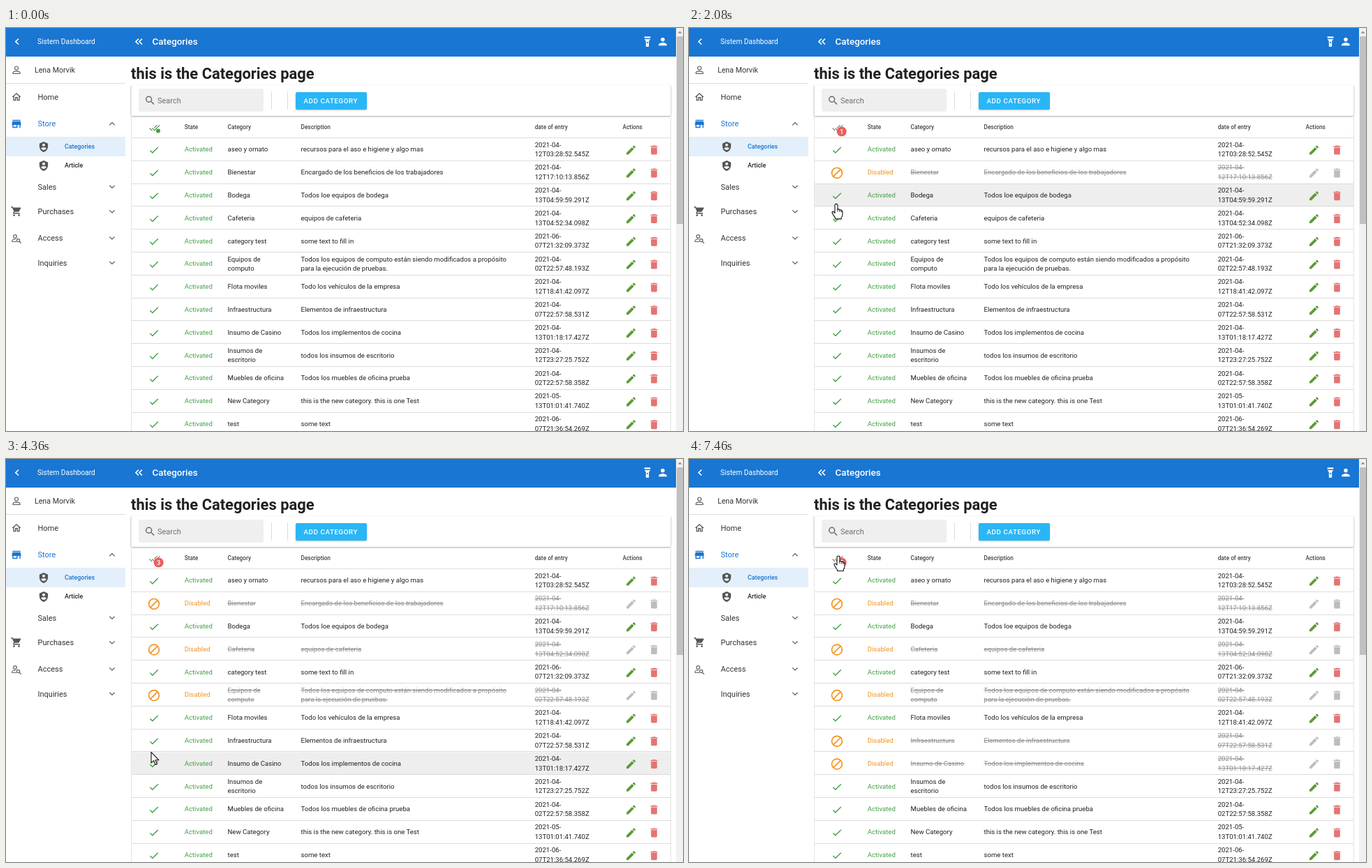
An HTML page that plays this animation: 970 px wide and 578 px high, repeating every 8 s.

```html
<!DOCTYPE html>
<html lang="en">
<head>
<meta charset="utf-8">
<title>Categories</title>
<style>
html, body { margin: 0; width: 100%; height: 100%; overflow: hidden; background: #fff; }
svg { display: block; width: 970px; height: 578px; }
text { font-family: Roboto, "Open Sans", sans-serif; font-size: 9.6px; fill: #212121; }
.off { fill: #8c8c8c; text-decoration: line-through; }
.menu { font-size: 11px; fill: #333; }
.sub { font-size: 8.9px; font-weight: 500; }
.head { font-size: 8.3px; font-weight: 500; fill: #444; }
</style>
</head>
<body>
<svg id="stage" viewBox="0 0 970 578"></svg>
<script>
const NS = 'http://www.w3.org/2000/svg';
const stage = document.getElementById('stage');
const LOOP = 8000, TOP = 158, PITCH = 32.8;
const BLUE = '#1976d2', GREEN = '#43a047', ORANGE = '#f39420', GREY = '#bdbdbd', DARK = '#555';

const ICON = {
  check: 'M9 16.17 4.83 12l-1.42 1.41L9 19 21 7l-1.41-1.41z',
  checkAll: 'M18 7l-1.41-1.41-6.34 6.34 1.41 1.41L18 7zm4.24-1.41L11.66 16.17 7.48 12l-1.41 1.41L11.66 19l12-12-1.42-1.41zM.41 13.41L6 19l1.41-1.41L1.83 12 .41 13.41z',
  edit: 'M3 17.25V21h3.75L17.81 9.94l-3.75-3.75L3 17.25zM20.71 7.04c.39-.39.39-1.02 0-1.41l-2.34-2.34c-.39-.39-1.02-.39-1.41 0l-1.83 1.83 3.75 3.75 1.83-1.83z',
  bin: 'M6 19c0 1.1.9 2 2 2h8c1.1 0 2-.9 2-2V7H6v12zM19 4h-3.5l-1-1h-5l-1 1H5v2h14V4z',
  person: 'M12 12c2.21 0 4-1.79 4-4s-1.79-4-4-4-4 1.79-4 4 1.79 4 4 4zm0 2c-2.67 0-8 1.34-8 4v2h16v-2c0-2.66-5.33-4-8-4z',
  home: 'M12 5.69l5 4.5V18h-2v-6H9v6H7v-7.81l5-4.5M12 3L2 12h3v8h6v-6h2v6h6v-8h3L12 3z',
  store: 'M20 4H4v2h16V4zm1 10v-2l-1-5H4l-1 5v2h1v6h10v-6h4v6h2v-6h1zm-9 4H6v-4h6v4z',
  cart: 'M7 18a2 2 0 1 0 0 4 2 2 0 1 0 0-4zM1 2v2h2l3.6 7.59-1.35 2.45C4.5 15.4 5.5 17 7 17h12v-2H7.42c-.2 0-.3-.2-.22-.37l.9-1.63h7.45c.75 0 1.41-.41 1.75-1.03l3.58-6.49A1 1 0 0 0 20 4H5.21l-.94-2H1zm16 16a2 2 0 1 0 0 4 2 2 0 1 0 0-4z',
  search: 'M15.5 14h-.79l-.28-.27A6.47 6.47 0 0 0 16 9.5 6.5 6.5 0 1 0 9.5 16c1.61 0 3.09-.59 4.23-1.57l.27.28v.79l5 4.99L20.49 19zm-6 0a4.5 4.5 0 1 1 0-9 4.5 4.5 0 0 1 0 9z',
  torch: 'M6 2h12v3H6zM6 7h12l-3 4v11H9V11zM12 12.5a1.5 1.5 0 1 0 0 3 1.5 1.5 0 0 0 0-3z',
  shield: 'M12 1L3 5v6c0 5.55 3.84 10.74 9 12 5.16-1.26 9-6.45 9-12V5zm0 4a3 3 0 1 1 0 6 3 3 0 0 1 0-6zM6.5 15c1-2 9.5-2.800 11 0-1.200 2-3 3.500-5.500 3.500S7.500 17 6.500 15z'
};

function el(tag, attrs, parent = stage) {
  const node = document.createElementNS(NS, tag);
  for (const key in attrs) node.setAttribute(key, attrs[key]);
  parent.appendChild(node);
  return node;
}
const rect = (x, y, width, height, fill, rx = 0, parent) => el('rect', { x, y, width, height, fill, rx }, parent);
const line = (d, stroke, width = 1.4, parent) => el('path', { d, stroke, 'stroke-width': width, fill: 'none' }, parent);
function text(str, x, y, attrs = {}, parent) {
  const node = el('text', { x, y, ...attrs }, parent);
  node.textContent = str;
  return node;
}
function icon(name, x, y, scale, fill, parent) {
  const transform = `translate(${x} ${y}) scale(${scale}) translate(-12 -12)`;
  return el('path', { d: ICON[name], transform, fill, 'fill-rule': 'evenodd' }, parent);
}
const show = (node, on) => node.setAttribute('visibility', on ? 'visible' : 'hidden');

const ROWS = [
  ['aseo y ornato', 'recursos para el aso e higiene y algo mas', '04-12T03:28:52.545Z'],
  ['Bienestar', 'Encargado de los beneficios de los trabajadores', '04-12T17:10:13.856Z'],
  ['Bodega', 'Todos loe equipos de bodega', '04-13T04:59:59.291Z'],
  ['Cafeteria', 'equipos de cafeteria', '04-13T04:52:34.098Z'],
  ['category test', 'some text to fill in', '06-07T21:32:09.373Z'],
  ['Equipos de|computo', 'Todos los equipos de computo están siendo modificados a propósito|para la ejecución de pruebas.', '04-02T22:57:48.193Z'],
  ['Flota moviles', 'Todo los vehículos de la empresa', '04-12T18:41:42.097Z'],
  ['Infraestructura', 'Elementos de infraestructura', '04-07T22:57:58.531Z'],
  ['Insumo de Casino', 'Todos los implementos de cocina', '04-13T01:18:17.427Z'],
  ['Insumos de|escritorio', 'todos los insumos de escritorio', '04-12T23:27:25.752Z'],
  ['Muebles de oficina', 'Todos los muebles de oficina prueba', '04-02T22:57:58.358Z'],
  ['New Category', 'this is the new category. this is one Test', '05-13T01:01:41.740Z'],
  ['test', 'some text', '06-07T21:36:54.269Z']
];

// Time and row of each click
const CLICKS = [[1550, 1], [2480, 3], [3720, 5], [4700, 7], [5490, 8]];

// Pointer path: time, x, y of the hot spot
const PATH = [
  [260, 240, 582], [650, 222, 330], [1010, 210, 214], [1210, 210, 214], [1340, 211, 211],
  [1640, 211, 211], [2280, 211, 271], [2550, 211, 271], [2760, 210, 320], [3110, 211, 349],
  [3230, 211, 349], [3440, 211, 345], [3800, 211, 345], [4360, 208, 420.3], [4420, 209, 430],
  [4550, 209, 430], [4640, 210, 409], [4900, 210, 409], [5230, 213, 433], [5760, 213, 433],
  [6170, 234, 335], [6310, 232, 246], [6650, 222, 165], [7000, 216, 138], [7310, 216, 138],
  [7320, 215, 140], [7450, 215, 140], [7460, 214, 139]
];

function drawTop() {
  rect(0, 0, 960, 41, BLUE);
  line('M18 15.500l-4.200 4 4.200 4', '#fff', 1.7);
  line('M190 15.500l-4 4 4 4M195 15.500l-4 4 4 4', '#fff', 1.7);
  text('Sistem Dashboard', 45, 23, { style: 'font-size:10.15px;fill:#fff' });
  text('Categories', 209.500, 24, { style: 'font-size:13.4px;font-weight:500;fill:#fff' });
  icon('torch', 919, 19.5, .72, '#fff');
  icon('person', 941, 19.5, .72, '#fff');
  rect(960, 0, 10, 578, '#f1f1f1');
  rect(961, 12, 9, 269, '#c1c1c1');
  el('path', { d: 'M962.500 7.500l3-3 3 3z', fill: '#8a8a8a' });
}

function drawMenu() {
  line('M0 79.500H171', '#ddd', 1);
  rect(0, 156, 171, 28, '#e3effa');
  const outline = { fill: 'none', stroke: '#666', 'stroke-width': 1.2 };
  el('circle', { cx: 15, cy: 57.5, r: 2.5, ...outline });
  el('path', { d: 'M10 65.300v-1.300q0-2 5-2.200 5 .2 5 2.200v1.300z', ...outline });
  icon('home', 15, 99, .66, DARK);
  icon('store', 15, 137.5, .72, BLUE);
  icon('shield', 54, 170.5, .68, DARK);
  icon('shield', 54, 197.5, .68, DARK);
  icon('cart', 15, 263, .7, DARK);
  el('circle', { cx: 13, cy: 299, r: 2.4, ...outline });
  el('path', { d: 'M15 306.500H8.800v-1.500q0-1.800 5-2', ...outline });
  el('circle', { cx: 17.5, cy: 304.5, r: 2.2, ...outline });
  line('M19.200 306.200l2.500 2.500', '#666', 1.3);

  text('Lena Morvik', 41, 63.5, { class: 'menu', style: 'font-size:10.65px' });
  text('Home', 45.5, 103, { class: 'menu' });
  text('Store', 45.5, 141, { class: 'menu', style: 'fill:' + BLUE });
  text('Categories', 84, 173, { class: 'sub', style: 'fill:' + BLUE });
  text('Article', 84, 200, { class: 'sub' });
  line('M148.300 139.300l3.700-3.700 3.700 3.700', DARK, 1.2);
  [['Sales', 227.5], ['Purchases', 263], ['Access', 301], ['Inquiries', 336.5]].forEach(([name, y]) => {
    text(name, 45.5, y + 4, { class: 'menu' });
    line(`M148.300 ${y - 1.7}l3.700 3.700 3.700-3.700`, DARK, 1.2);
  });
}

function drawToolbar() {
  text('this is the Categories page', 179, 73, { style: 'font-size:21.9px;font-weight:700' });
  rect(179, 82, 773.5, 44, '#fff', 2).setAttribute('style', 'filter:drop-shadow(0 1px 1px rgba(0,0,0,.35))');
  rect(190, 87, 179, 33, '#efefef', 3);
  icon('search', 206.5, 104, .72, '#666');
  text('Search', 217, 107.500, { style: 'font-size:11px;fill:#707070' });
  line('M380.500 91V117M403.500 91V117', '#ddd', 1);
  rect(415, 92, 102, 25, '#29b6f6', 2).setAttribute('style', 'filter:drop-shadow(0 1px 1px rgba(0,0,0,.25))');
  text('ADD CATEGORY', 426.5, 107.7, { style: 'font-size:9.8px;font-weight:500;letter-spacing:.55px;fill:#fff' });
}

function block(parent, x, y) {
  el('circle', { cx: x, cy: y, r: 7.4, fill: 'none', stroke: ORANGE, 'stroke-width': 1.7 }, parent);
  line(`M${x + 5.2} ${y - 5.2}L${x - 5.2} ${y + 5.2}`, ORANGE, 1.7, parent);
}

function drawCells(parent, row, mid, off) {
  const cls = off ? { class: 'off' } : {};
  const cell = (str, x) => {
    const parts = str.split('|');
    parts.forEach((part, i) => text(part, x, mid + 3.300 + (i - (parts.length - 1) / 2) * 13.7, cls, parent));
  };
  if (off) block(parent, 212, mid + 1);
  else icon('check', 212, mid + 1, .7, GREEN, parent);
  text(off ? 'Disabled' : 'Activated', 255.7, mid + 3.3, { style: 'fill:' + (off ? ORANGE : GREEN) }, parent);
  cell(row[0], 317.5);
  cell(row[1], 422.5);
  cell('2021-' + row[2].replace('-', '-|'), 757.7);
  icon('edit', 895.5, mid + 1, .72, off ? GREY : '#5b9b35', parent);
  icon('bin', 928.5, mid + 1, .72, off ? GREY : '#e57373', parent);
}

drawToolbar();
const hover = rect(179, 0, 773, PITCH, '#eee');
[['State', 255.7], ['Category', 317.5], ['Description', 422.5], ['date of entry', 757.7], ['Actions', 883.5]]
  .forEach(([name, x]) => text(name, x, 145, { class: 'head' }));
const allMark = icon('checkAll', 213, 143, .68, GREEN);
const dot = el('circle', { cx: 218, cy: 147.5, r: 3, fill: GREEN });
const badge = el('g', {});
el('circle', { cx: 218.7, cy: 148.5, r: 7, fill: '#e5625e' }, badge);
const count = text('', 218.7, 151.7, { 'text-anchor': 'middle', style: 'font-size:8.8px;font-weight:500;fill:#fff' }, badge);

const rows = ROWS.map((row, i) => {
  const mid = TOP + PITCH * i + 16.1;
  const y = Math.round(TOP + PITCH * i) - .5;
  line(`M179 ${y}H952`, '#dcdcdc', 1);
  const on = el('g', {}), off = el('g', {});
  drawCells(on, row, mid, false);
  drawCells(off, row, mid, true);
  return { on, off };
});
line('M179.500 82V578M952.500 82V578', '#e4e4e4', 1);
drawMenu();
drawTop();

const ink = { fill: '#fff', stroke: '#111', 'stroke-width': 1.1, 'stroke-linejoin': 'round' };
const arrow = el('path', { d: 'M0 0V15.500L3.600 12.200L6.200 18L8.500 17L6 11.300H11Z', ...ink });
const hand = el('g', {});
el('path', { d: 'M-2 13V2Q-2 0 0 0Q2 0 2 2V8Q4 6.800 5 8.600Q7 7.800 7.200 9.600Q9 9.200 9 11.500V15Q9 18 7.200 19.500V21.500H-1.500V20L-5 14.500Q-7 11.500-5 11Q-3.500 10.800-2 13Z', ...ink }, hand);
line('M2 7v4M4.800 8.500V11.500M7.200 9.600V12', '#111', .9, hand);

function pointerAt(t) {
  const next = PATH.findIndex(p => p[0] > t);
  if (next === 0) return PATH[0].slice(1);
  if (next < 0) return PATH[PATH.length - 1].slice(1);
  const a = PATH[next - 1], b = PATH[next];
  const k = (t - a[0]) / (b[0] - a[0]);
  return [a[1] + (b[1] - a[1]) * k, a[2] + (b[2] - a[2]) * k];
}

function render(t) {
  const done = CLICKS.filter(c => t >= c[0]).map(c => c[1]);
  rows.forEach((row, i) => {
    show(row.on, !done.includes(i));
    show(row.off, done.includes(i));
  });
  show(dot, !done.length);
  show(badge, done.length > 0);
  count.textContent = done.length || '';
  allMark.setAttribute('fill', done.length ? '#8d8880' : '#6a9a6c');

  const [x, y] = pointerAt(t);
  const row = Math.floor((y - TOP) / PITCH);
  const mid = row < 0 ? 143 : TOP + PITCH * (row + .5);
  const visible = t >= 260;
  const onButton = Math.abs(y - mid) < 12.5 && x < 240;
  show(hover, visible && row >= 0);
  hover.setAttribute('y', TOP + PITCH * row);
  show(arrow, visible && !onButton);
  show(hand, visible && onButton);
  [arrow, hand].forEach(p => p.setAttribute('transform', `translate(${x} ${y})`));
}

function tick() {
  render(performance.now() % LOOP);
  requestAnimationFrame(tick);
}
tick();
</script>
</body>
</html>
```
